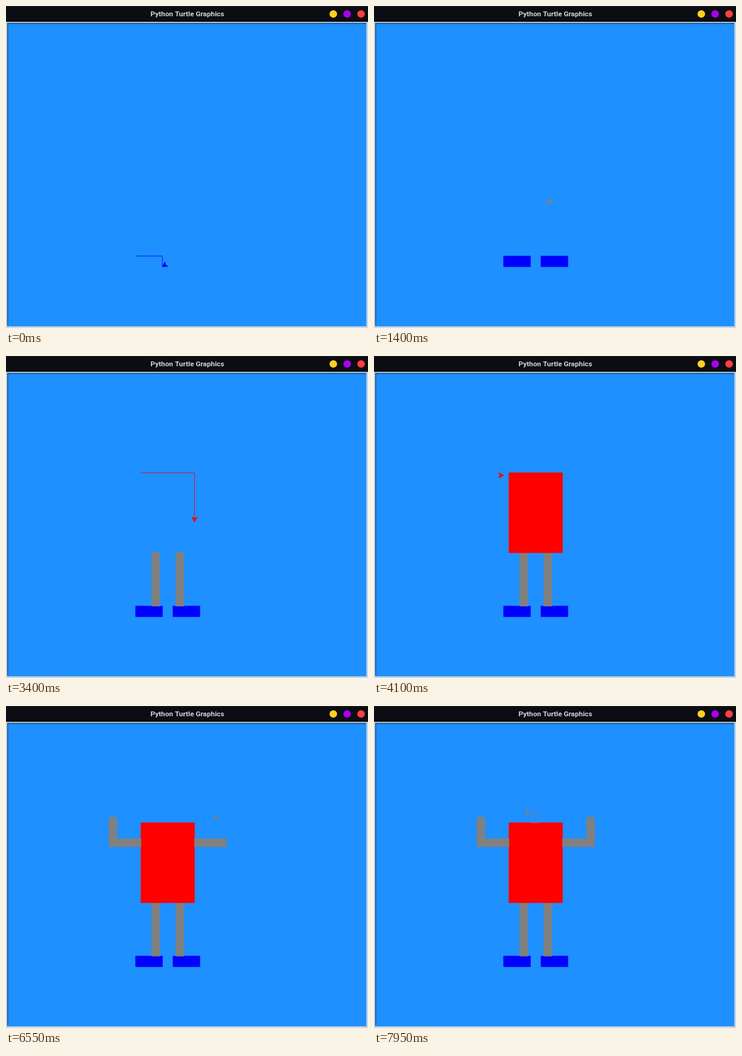
An HTML page with a canvas for the animation above (8000 ms loop, 600 by 533 pixels).

```html
<!DOCTYPE html>
<html lang="en">
<head>
<meta charset="utf-8">
<title>Python Turtle Graphics</title>
<style>
  html, body { margin: 0; width: 100%; height: 100%; overflow: hidden; background: #0b0d13; }
  canvas { display: block; width: 600px; height: 533px; }
</style>
</head>
<body>
<canvas id="stage" width="600" height="533"></canvas>
<script>
const ctx = document.getElementById('stage').getContext('2d');
const LOOP = 8000, FRAME = 50;
const SCALE_X = 0.886, SCALE_Y = 0.883, ORIGIN_X = 303.5, ORIGIN_Y = 281.5;
const HOP = 12, TURN_STEPS = 11;

// Start corner, signed width, height, color
const parts = [
  [-100, -150, 50, 20, 'blue'],    // feet
  [-30, -150, 50, 20, 'blue'],
  [-25, -50, 15, 100, 'grey'],     // legs
  [-55, -50, -15, 100, 'grey'],
  [-90, 100, 100, 150, 'red'],     // body
  [-150, 70, 60, 15, 'grey'],      // arms
  [-150, 110, 15, 40, 'grey'],
  [10, 70, 60, 15, 'grey'],
  [55, 110, 15, 40, 'grey'],
  [-50, 120, 15, 20, 'grey'],      // neck
];

// Elapsed ms and turtle ticks; linear in between
const pace = [[0, 30.5], [4100, 418.5], [6550, 653.6], [8000, 791.2]];

function recordTicks() {
  const ticks = [];
  const turtle = { x: -100, y: -150, heading: 0, color: 'blue', done: 0, path: [] };
  const tick = (count = 1) => {
    while (count--) ticks.push({ ...turtle, path: [...turtle.path] });
  };

  function moveTo(x, y) {
    const { x: x0, y: y0 } = turtle;
    const hops = 1 + Math.floor(Math.hypot(x - x0, y - y0) / HOP);
    for (let i = 1; i <= hops; i++) {
      turtle.x = x0 + (x - x0) * i / hops;
      turtle.y = y0 + (y - y0) * i / hops;
      tick();
    }
  }

  function forward(distance) {
    const a = turtle.heading * Math.PI / 180;
    moveTo(turtle.x + distance * Math.cos(a), turtle.y + distance * Math.sin(a));
    turtle.path.push([turtle.x, turtle.y]);
  }

  function right() {
    const start = turtle.heading;
    for (let i = 1; i <= TURN_STEPS; i++) {
      turtle.heading = start - 90 * i / TURN_STEPS;
      tick();
    }
    turtle.heading = (start + 270) % 360;
    tick();
  }

  tick();
  parts.forEach(([x, y, width, height, color], index) => {
    if (index) moveTo(x, y);
    tick(2);
    turtle.color = color;
    turtle.path = [[x, y]];
    tick(2);
    for (const side of [width, height, width, height]) {
      forward(side);
      right();
    }
    turtle.done++;
    turtle.path = [];
    tick(2);
  });
  return ticks;
}

const ticks = recordTicks();

function tickAt(time) {
  const i = pace.findIndex(([end]) => time < end);
  const [t0, n0] = pace[i - 1], [t1, n1] = pace[i];
  const n = Math.floor(n0 + (n1 - n0) * (time - t0) / (t1 - t0));
  return ticks[Math.min(n, ticks.length - 1)];
}

function box(color, x, y, width, height) {
  ctx.fillStyle = color;
  ctx.fillRect(x, y, width, height);
}

function trace(points) {
  ctx.beginPath();
  for (const [x, y] of points) ctx.lineTo(ORIGIN_X + x * SCALE_X, ORIGIN_Y - y * SCALE_Y);
}

function fillShape(points, color) {
  trace(points);
  ctx.closePath();
  ctx.fillStyle = ctx.strokeStyle = color;
  ctx.fill();
  ctx.stroke();
}

function drawWindow() {
  box('#0b0d13', 0, 0, 600, 27);
  box('#24262b', 0, 0, 600, 0.8);
  box('#d9d9d9', 0, 26.3, 600, 506.7);
  box('#8ec7ff', 1.8, 28, 596.7, 503.3);
  box('#125699', 1.8, 28, 595.2, 501.6);
  box('#1e90ff', 3.5, 29.7, 593.5, 499.9);

  ctx.fillStyle = '#d2d3d5';
  ctx.font = 'bold 11.8px Roboto, sans-serif';
  ctx.textAlign = 'center';
  ctx.fillText('Python Turtle Graphics', 300.5, 17);

  ['#ffd21c', '#a800f0', '#ff4040'].forEach((color, i) => {
    ctx.fillStyle = color;
    ctx.beginPath();
    ctx.arc(542.5 + 23 * i, 13.2, 6.2, 0, 2 * Math.PI);
    ctx.fill();
  });
}

function drawTurtle({ x, y, heading, color }) {
  const a = heading * Math.PI / 180, c = Math.cos(a), s = Math.sin(a);
  const arrow = [[0, 0], [-9, 5], [-7, 0], [-9, -5]];
  fillShape(arrow.map(([u, v]) => [x + u * c - v * s, y + u * s + v * c]), color);
}

function draw(time) {
  const state = tickAt(time);
  ctx.lineWidth = 0.9;
  ctx.lineJoin = 'round';
  drawWindow();
  for (const [x, y, w, h, color] of parts.slice(0, state.done)) {
    fillShape([[x, y], [x + w, y], [x + w, y - h], [x, y - h]], color);
  }
  if (state.path.length) {
    trace([...state.path, [state.x, state.y]]);
    ctx.strokeStyle = state.color;
    ctx.stroke();
  }
  drawTurtle(state);
}

function animate() {
  const time = performance.now() % LOOP;
  draw(Math.floor(time / FRAME) * FRAME);
  requestAnimationFrame(animate);
}
animate();
</script>
</body>
</html>
```
